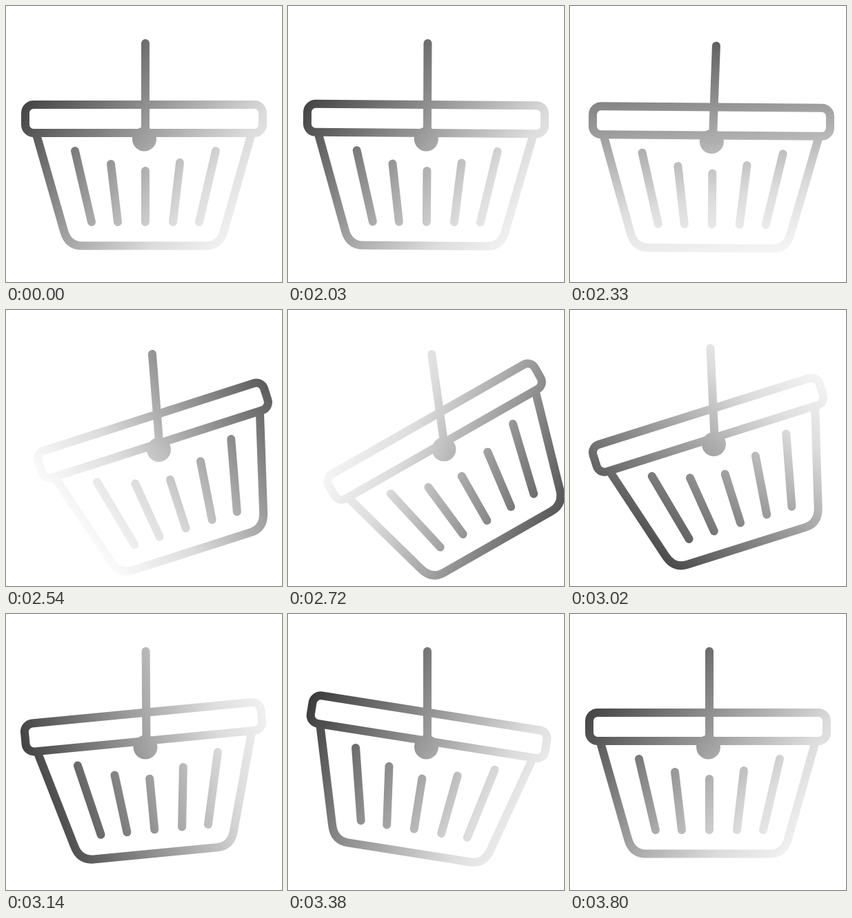
An HTML page that plays this animation: 400 by 400 pixels, repeating every 3.83 s.

```html
<!DOCTYPE html>
<html lang="en">
<head>
<meta charset="utf-8">
<title>Swinging basket</title>
<style>
  html, body { margin: 0; width: 100%; height: 100%; overflow: hidden; background: #fff; }
  svg { display: block; width: 100vw; height: 100vh; }
  #art { fill: none; stroke: #fff; stroke-width: 12; stroke-linecap: round; }
</style>
</head>
<body>
<svg viewBox="0 0 400 400">
  <defs>
    <!-- Lies along the x axis and turns about the origin -->
    <linearGradient id="shade" gradientUnits="userSpaceOnUse" x1="331" y1="0" x2="-196" y2="0">
      <stop offset="0" stop-color="#000"/>
      <stop offset=".76" stop-color="#dcdcdc"/>
      <stop offset="1" stop-color="#fff"/>
    </linearGradient>
    <mask id="cut" maskUnits="userSpaceOnUse" x="0" y="0" width="400" height="400">
      <g id="art">
        <g id="basket">
          <rect x="28" y="143" width="344" height="41" rx="12"/>
          <path stroke-linecap="butt" d="M44 186L84 326Q90 347.5 110 347.5H290Q310 347.5 316 326L355.500 186"/>
          <path d="M100 210L124 313M152 229L162 313M202 239V313M252 227L242 313M304 210L280 313"/>
        </g>
        <g id="handle">
          <path d="M202 54V190"/>
          <circle cx="200.500" cy="193" r="17.500" fill="#fff" stroke="none"/>
        </g>
      </g>
    </mask>
  </defs>
  <rect width="400" height="400" fill="url(#shade)" mask="url(#cut)"/>
</svg>
<script>
  const LOOP = 3830, STEP = 30, REST = 2030;
  const START = 2010, WOUND = 2150;
  const $ = id => document.getElementById(id);
  const place = (id, value, name = 'transform') => $(id).setAttribute(name, value);

  // Smooth 0 to 1 between two times.
  function ease(t, from, to) {
    const k = Math.min(1, Math.max(0, (t - from) / (to - from)));
    return k * k * (3 - 2 * k);
  }

  // Wind up a little, pull to a peak, then settle at an end value.
  const pull = (t, windUp, peak, peakTime, end, endTime) =>
    windUp * ease(t, START, WOUND) +
    (peak - windUp) * ease(t, WOUND, peakTime) +
    (end - peak) * ease(t, peakTime, endTime);

  function draw(now) {
    let t = now % LOOP;
    t = t < REST ? 0 : REST + STEP * Math.floor((t - REST) / STEP);

    const x = pull(t, -3, 26, 2680, 0, 3220);
    const y = pull(t, 0, 10, 2600, 0, 3150);
    const tilt = pull(t, 5, -8, 2740, 0, 3200);
    const swing = pull(t, 8, -31, 2790, 9, 3380) - 9 * ease(t, 3380, 3800);
    const light = 220 + 360 * ease(t, START, 3520);

    place('art', `translate(${x} ${y})`);
    place('basket', `rotate(${swing} 201 190)`);
    place('handle', `rotate(${tilt} 201 194)`);
    place('shade', `translate(245 203) rotate(${light})`, 'gradientTransform');
  }

  const begin = performance.now();
  function tick() {
    draw(performance.now() - begin);
    requestAnimationFrame(tick);
  }
  tick();
</script>
</body>
</html>
```
